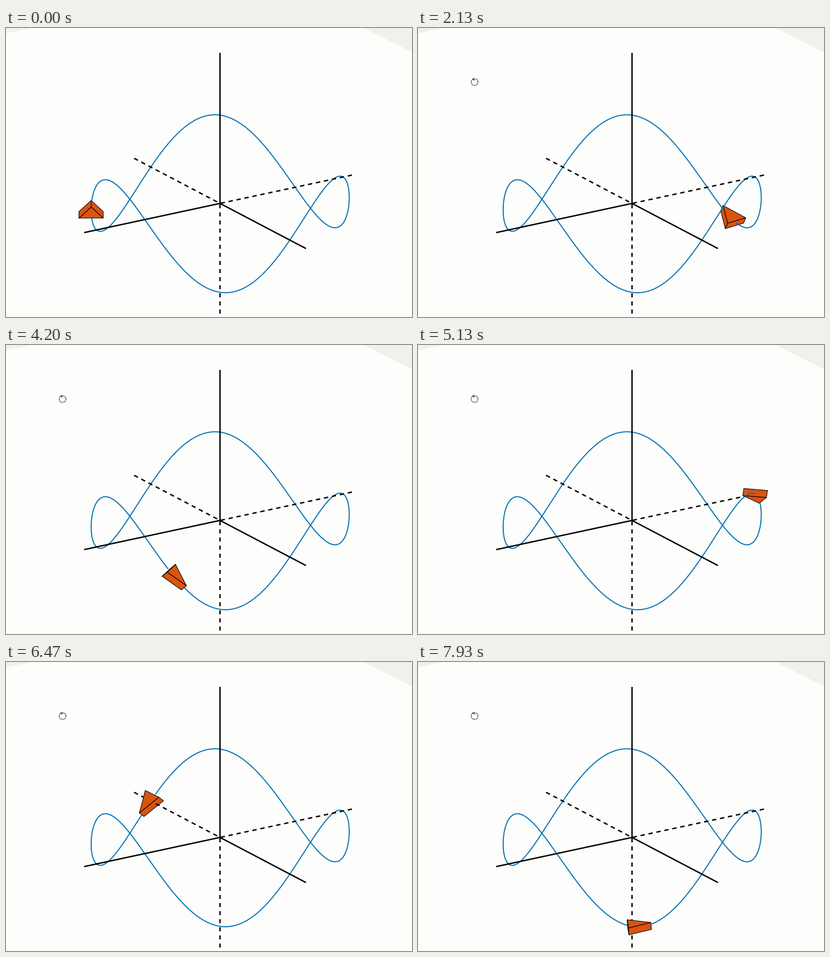
Animation of 700 by 500 pixels, one loop 8000 ms. Source, as a matplotlib script:

```python
import numpy as np
import matplotlib.pyplot as plt
from matplotlib.animation import FuncAnimation
from matplotlib.collections import PolyCollection

W, H, DPI = 700, 500, 100
LOOP, TICK = 8000, 20
STEPS = 120
PX = 72 / DPI

# View space: right, towards the viewer, up
ORIGIN = np.array([368.5, 303.0])
SIN_E, COS_E = 0.337, 0.9405
VIEW = np.array([0, COS_E, SIN_E])
X_ANGLE = np.radians(147.4)
RADIUS, WAVE = 222.5, 84.0

# Arrow body: length, width, thickness
LEN, WID, THICK = 40.0, 42.0, 12.8

# Angle of the arrow (degrees) at some steps
KEY_STEPS = [0, 18, 32, 49, 77, 97, 119]
KEY_ANGLES = [179.6, 55.7, -41.6, -154.3, -346, -484, -633.3]


def project(p):
    p = np.asarray(p)
    return np.stack([ORIGIN[0] + p[..., 0],
                     ORIGIN[1] + SIN_E * p[..., 1] - COS_E * p[..., 2]], -1)


def path(t):
    z = WAVE * np.cos(3 * (X_ANGLE - t))
    return np.stack([RADIUS * np.cos(t) + 0.3,
                     RADIUS * np.sin(t), z - 0.6], -1)


def body_axes(t):
    """Rows: heading, side, underside."""
    head = np.array([RADIUS * np.sin(t), -RADIUS * np.cos(t),
                     -3 * WAVE * np.sin(3 * (X_ANGLE - t))])
    head /= np.linalg.norm(head)
    side = np.array([np.cos(t), np.sin(t), 0])
    under = np.cross(side, head)
    if under[2] > 0:
        under = -under
    return np.array([head, side, under])


# Prism in its own axes
A, S, C = LEN / 2, WID / 2, THICK / 2
BODY = np.array([[a, s, c] for c in (-C, C)
                 for a, s in ((A, 0), (-A, -S), (-A, S))])
FACES = [[0, 1, 2], [3, 4, 5], [1, 2, 5, 4], [0, 2, 5, 3], [0, 1, 4, 3]]
R = S / LEN
NORMALS = np.array([[0, 0, -1], [0, 0, 1], [-1, 0, 0], [R, 1, 0], [R, -1, 0]])
OFFSETS = np.array([C, C, A, R * A, R * A])


def hidden(points, pos, axes):
    """True where the arrow lies between a point and the viewer."""
    local = (points - pos) @ axes.T
    rate = NORMALS @ (axes @ VIEW)
    rate = np.where(np.abs(rate) < 1e-6, 1e-6, rate)
    hit = (OFFSETS - local @ NORMALS.T) / rate
    enter = np.where(rate < 0, hit, -np.inf).max(1)
    leave = np.where(rate > 0, hit, np.inf).min(1)
    return np.maximum(enter, 0) < leave


def segment(start, end, dashed=False):
    start, end = np.array(start, float), np.array(end, float)
    size = np.linalg.norm(project(end) - project(start))
    k = np.linspace(0, 1, int(size * 2) + 1)
    pts = start + k[:, None] * (end - start)
    gap = (k * size) % 14 > 8 if dashed else np.zeros(len(k), bool)
    return pts, gap


fig = plt.figure(figsize=(W / DPI, H / DPI), dpi=DPI, facecolor="#fdfdfb")
ax = fig.add_axes([0, 0, 1, 1])
ax.set_xlim(-0.5, W - 0.5)
ax.set_ylim(H - 0.5, -0.5)
ax.axis("off")

for corner in ([-1, 45, -1], [-1, -1, 9]), ([616, 701, 701], [-1, -1, 42]):
    ax.fill(*corner, color="#f0f0ec", lw=0)

arrow = PolyCollection([], facecolor="#d95410", edgecolor="black",
                       linewidth=1.0 * PX, zorder=2)
ax.add_collection(arrow)

x_dir = np.array([np.cos(X_ANGLE), np.sin(X_ANGLE), 0])
y_dir = np.array([np.sin(X_ANGLE), -np.cos(X_ANGLE), 0])
zero = np.zeros(3)
parts = [segment(zero, x_dir * 278), segment(x_dir * -270, zero, True),
         segment(zero, y_dir * 275), segment(y_dir * -275, zero, True),
         segment(zero, [0, 0, 277.5]), segment([0, 0, -277.5], zero, True)]

lines = []


def add_line(pts, gap, color, width, z):
    line, = ax.plot([], [], color=color, lw=width * PX, zorder=z,
                    solid_capstyle="butt", solid_joinstyle="round")
    lines.append((line, pts, gap, project(pts)))


loop = path(np.linspace(0, 2 * np.pi, 900))
add_line(loop, np.zeros(len(loop), bool), "#0072b4", 1.8, 3)
for pts, gap in parts:
    add_line(pts, gap, "black", 2.4, 4)

# Rotate pointer
ring = np.linspace(0, 2 * np.pi, 60)
pointer = ax.plot(97 + 5.8 * np.cos(ring), 93 + 5.8 * np.sin(ring),
                  color="black", lw=1.3 * PX, ls=(0, (1.2, 1.0)), zorder=5)
pointer += ax.plot([93, 96, 96], [88, 87.5, 90], color="black",
                   lw=1 * PX, zorder=5)


def draw(frame):
    # The pose is held for one step; half a tick of lead centres the sampling
    step = int((frame * TICK + 14) * STEPS / LOOP)
    t = np.radians(np.interp(step, KEY_STEPS, KEY_ANGLES))
    pos, axes = path(t), body_axes(t)
    corners = project(pos + BODY @ axes)
    facing = NORMALS @ (axes @ VIEW) > 0
    arrow.set_verts([corners[f] for f, seen in zip(FACES, facing) if seen])
    for line, pts, gap, flat in lines:
        off = gap | hidden(pts, pos, axes)
        xy = np.where(off[:, None], np.nan, flat)
        line.set_data(xy[:, 0], xy[:, 1])
    for p in pointer:
        p.set_visible(step > 0)
    return [arrow, *pointer, *(entry[0] for entry in lines)]


anim = FuncAnimation(fig, draw, frames=LOOP // TICK, interval=TICK,
                     repeat=True, repeat_delay=0, blit=False)
plt.show()
```
